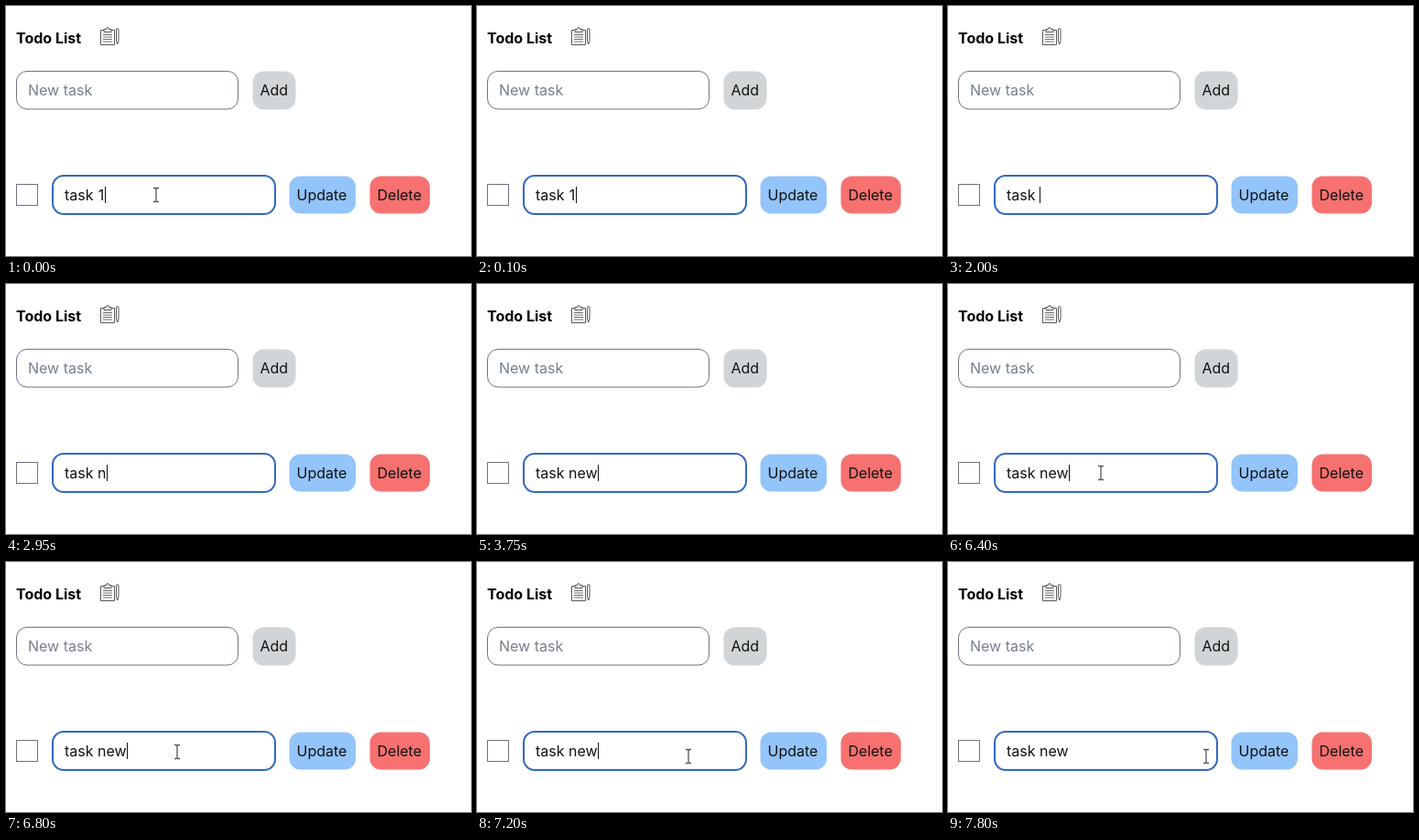
An HTML page that plays this animation: 508x274 px, repeating every 8 s.

```html
<!DOCTYPE html>
<html lang="en">
<head>
<meta charset="utf-8">
<title>Todo List</title>
<style>
  html, body { margin: 0; width: 100%; height: 100%; overflow: hidden; background: #fff; }
  svg { display: block; width: 508px; height: 274px; }
  text { font: 16px Inter, sans-serif; fill: #111; white-space: pre; }
  .title { font-weight: 700; fill: #000; }
  .hint { fill: #75808d; }
  .field { fill: #fff; stroke: #6b7280; }
  .focus { stroke: #3168c2; stroke-width: 2; }
  .icon { fill: none; stroke: #444; stroke-width: .9; }

  .anim, .anim * { animation: 8s step-end infinite; }
  .anim .one { animation-name: one; }
  .anim .n { animation-name: n; }
  .anim .e { animation-name: e; }
  .anim .w { animation-name: w; }
  .anim .caret { animation-name: caret-move, caret-blink; }
  .anim .beam { animation-name: beam-move, beam-show; }

  @keyframes one { 0% { fill-opacity: 1 } 25%, 100% { fill-opacity: 0 } }
  @keyframes n { 0% { fill-opacity: 0 } 36.875%, 100% { fill-opacity: 1 } }
  @keyframes e { 0% { fill-opacity: 0 } 41.875%, 100% { fill-opacity: 1 } }
  @keyframes w { 0% { fill-opacity: 0 } 45.625%, 100% { fill-opacity: 1 } }

  @keyframes caret-move {
    0% { transform: translateX(108px) }
    25% { transform: translateX(100px) }
    36.875% { transform: translateX(110px) }
    41.875% { transform: translateX(119px) }
    45.625%, 100% { transform: translateX(132px) }
  }
  @keyframes caret-blink {
    0%, 36.875%, 80% { opacity: 1 }
    30%, 58.75%, 92.5%, 100% { opacity: 0 }
  }
  @keyframes beam-move {
    0% { transform: translate(164px, 207px) }
    1.25% { transform: translate(167px, 207px) }
    81.25% { transform: translate(171px, 207px) }
    82.5% { transform: translate(176px, 207px) }
    85% { transform: translate(187px, 208px) }
    87.5% { transform: translate(204px, 210px) }
    90% { transform: translate(231px, 213px) }
    92.5% { transform: translate(260px, 214px) }
    95% { transform: translate(272px, 214px) }
    97.5%, 100% { transform: translate(282px, 213px) }
  }
  @keyframes beam-show {
    0%, 80%, 100% { opacity: 1 }
    1.25% { opacity: 0 }
  }
</style>
</head>
<body>
<svg viewBox="0 0 508 274">
  <text class="title" x="11" y="41">Todo List</text>

  <g class="icon">
    <path d="M107 26.5H103.5V42.5H118.5V26.5H115"/>
    <path d="M107 28.5V25.5H109.5Q109.5 23.5 111 23.5T112.500 25.500H115V28.500Z"/>
    <path d="M106 31.500H116M106 34H116M106 36.500H116M106 39H116" stroke-width=".8"/>
    <path d="M120.500 26V38L121.700 42L123 38V26Q123 24.500 121.700 24.500T120.500 26Z"/>
  </g>

  <rect class="field" x="11.500" y="71.500" width="242" height="41.500" rx="11.500"/>
  <text class="hint" x="24" y="98">New task</text>
  <rect x="269.500" y="71.500" width="47" height="42" rx="12" fill="#d1d5d8"/>
  <text x="277.500" y="98">Add</text>

  <rect class="field" x="11.500" y="195.500" width="23" height="23"/>
  <rect class="field focus" x="51" y="186" width="243" height="42" rx="12"/>
  <rect x="309.500" y="186.500" width="72.500" height="41" rx="12" fill="#93c4fa"/>
  <text x="317.500" y="213">Update</text>
  <rect x="397.500" y="186.500" width="65.500" height="41" rx="12" fill="#f6716f"/>
  <text x="405.500" y="213">Delete</text>

  <g class="anim">
    <text class="base" x="64" y="213">task <tspan class="n">n</tspan><tspan class="e">e</tspan><tspan class="w">w</tspan></text>
    <text class="one" x="100.800" y="213">1</text>
    <rect class="caret" y="198" width="1" height="18" fill="#111"/>
    <g class="beam" fill="none" stroke="#555">
      <path d="M-3 -7.500H-1L0 -6.500L1 -7.500H3M0 -6.500V6.500M-3 7.500H-1L0 6.500L1 7.500H3" stroke-width="1.300"/>
    </g>
  </g>
</svg>
</body>
</html>
```
